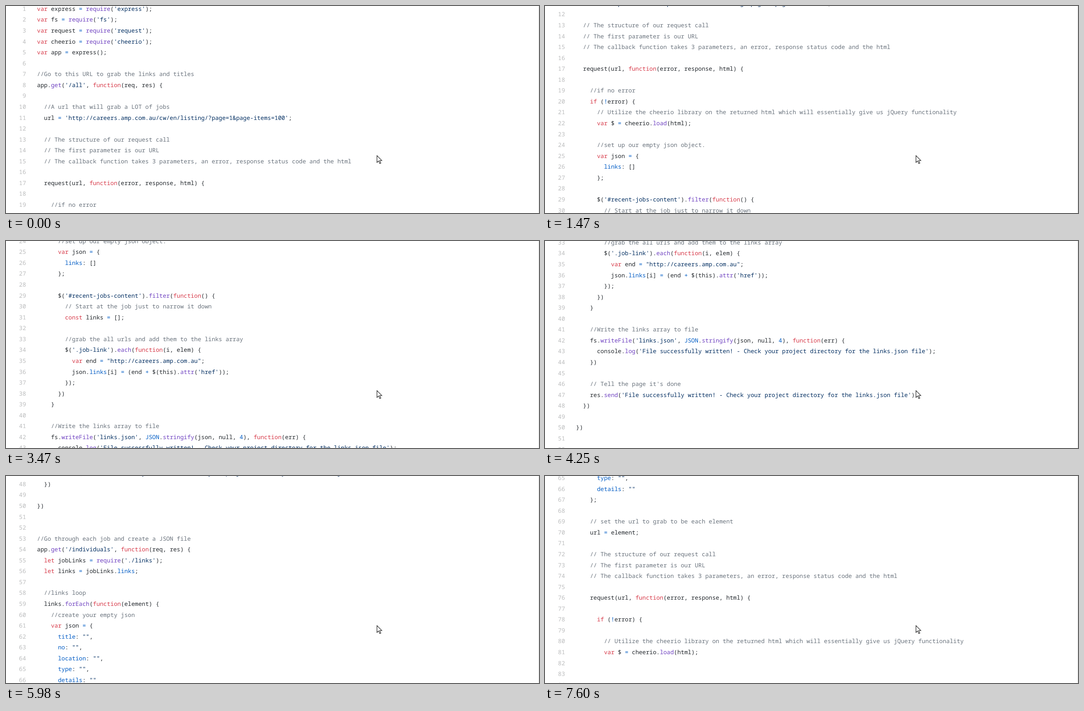
An HTML page that plays this animation: 1199 by 467 pixels, repeating every 7680 ms.

```html
<!DOCTYPE html>
<html lang="en">
<head>
<meta charset="utf-8">
<title>Scrolling code</title>
<style>
  html, body { margin: 0; width: 100%; height: 100%; overflow: hidden; background: #fff; }
  body { position: relative; }
  pre {
    position: absolute; left: 29.3px; margin: 0; color: #24292e;
    font: 13.1px/24.56px "Noto Sans Mono", "DejaVu Sans Mono", monospace;
    text-rendering: geometricPrecision; font-variant-ligatures: none;
  }
  .num { color: #bbbcbd; margin-right: 24.8px; }
  .comment { color: #6a737d; }
  .string { color: #032f62; }
  .keyword { color: #d73a49; }
  .call { color: #6f42c1; }
  .value { color: #005cc5; }
  #edge { position: absolute; left: 1198px; top: 0; width: 1px; height: 100%; background: #ddd; }
  svg { position: absolute; left: 833px; top: 336px; }
</style>
</head>
<body>
<pre id="code"></pre>
<div id="edge"></div>
<svg width="14" height="22"><path d="M1.5 1.5V17l3.6-3.4 2.7 5.9 2.4-1.1-2.6-5.7h4.9z" fill="#fff" stroke="#111" stroke-width="1.1"/></svg>
<script>
const text = `var express = require('express');
var fs = require('fs');
var request = require('request');
var cheerio = require('cheerio');
var app = express();

//Go to this URL to grab the links and titles
app.get('/all', function(req, res) {

  //A url that will grab a LOT of jobs
  url = 'http://careers.amp.com.au/cw/en/listing/?page=1&amp;page-items=100';

  // The structure of our request call
  // The first parameter is our URL
  // The callback function takes 3 parameters, an error, response status code and the html

  request(url, function(error, response, html) {

    //if no error
    if (!error) {
      // Utilize the cheerio library on the returned html which will essentially give us jQuery functionality
      var $ = cheerio.load(html);

      //set up our empty json object.
      var json = {
        links: []
      };

      $('#recent-jobs-content').filter(function() {
        // Start at the job just to narrow it down
        const links = [];

        //grab the all urls and add them to the links array
        $('.job-link').each(function(i, elem) {
          var end = "http://careers.amp.com.au";
          json.links[i] = (end + $(this).attr('href'));
        });
      })
    }

    //Write the links array to file
    fs.writeFile('links.json', JSON.stringify(json, null, 4), function(err) {
      console.log('File successfully written! - Check your project directory for the links.json file');
    })

    // Tell the page it's done
    res.send('File successfully written! - Check your project directory for the links.json file')
  })

})


//Go through each job and create a JSON file
app.get('/individuals', function(req, res) {
  let jobLinks = require('./links');
  let links = jobLinks.links;

  //links loop
  links.forEach(function(element) {
    //create your empty json
    var json = {
      title: "",
      no: "",
      location: "",
      type: "",
      details: ""
    };

    // set the url to grab to be each element
    url = element;

    // The structure of our request call
    // The first parameter is our URL
    // The callback function takes 3 parameters, an error, response status code and the html

    request(url, function(error, response, html) {

      if (!error) {

        // Utilize the cheerio library on the returned html which will essentially give us jQuery functionality
        var $ = cheerio.load(html);


`;

const kinds = ['comment', 'string', 'keyword', 'call', 'value'];
const token = /(\/\/.*)|('[^']*'|"[^"]*")|\b(var|let|const|function|if)\b|(\brequire\b|(?<=\.)\w+(?=\())|(\w+(?=:)|(?<=\.)links|JSON|[=+!]|\b4\b)/g;
const span = (kind, s) => `<span class="${kind}">${s}</span>`;
const paint = line => line.replace(token, (s, ...groups) =>
  span(kinds[groups.slice(0, 5).findIndex(g => g !== undefined)], s));

const code = document.getElementById('code');
code.innerHTML = text.split('\n')
  .map((line, i) => span('num', String(i + 1).padStart(2)) + paint(line))
  .join('\n');

// Wheel scrolls: first step, last step (ms), step count, end position (px)
const LOOP = 7680;
const scrolls = [
  [170, 1470, 18, 257.7],
  [1860, 3090, 17, 558.3],
  [3470, 4800, 18, 937.7],
  [5260, 6510, 17, 1253.4],
  [6910, 8136, 17, 1747.4]
];

function ease(u) {
  const v = u ** 0.92;
  return 0.35 * v + 0.65 * v * v * (3 - 2 * v);
}

function position(t) {
  let y = 0;
  for (const [start, end, steps, to] of scrolls) {
    if (t < start) break;
    const done = Math.floor((t - start) / (end - start) * (steps - 1) + 1e-6) + 1;
    y += (to - y) * ease(Math.min(done / steps, 1));
  }
  return y;
}

function draw() {
  code.style.top = -6.1 - position(performance.now() % LOOP) + 'px';
  requestAnimationFrame(draw);
}
draw();
</script>
</body>
</html>
```
